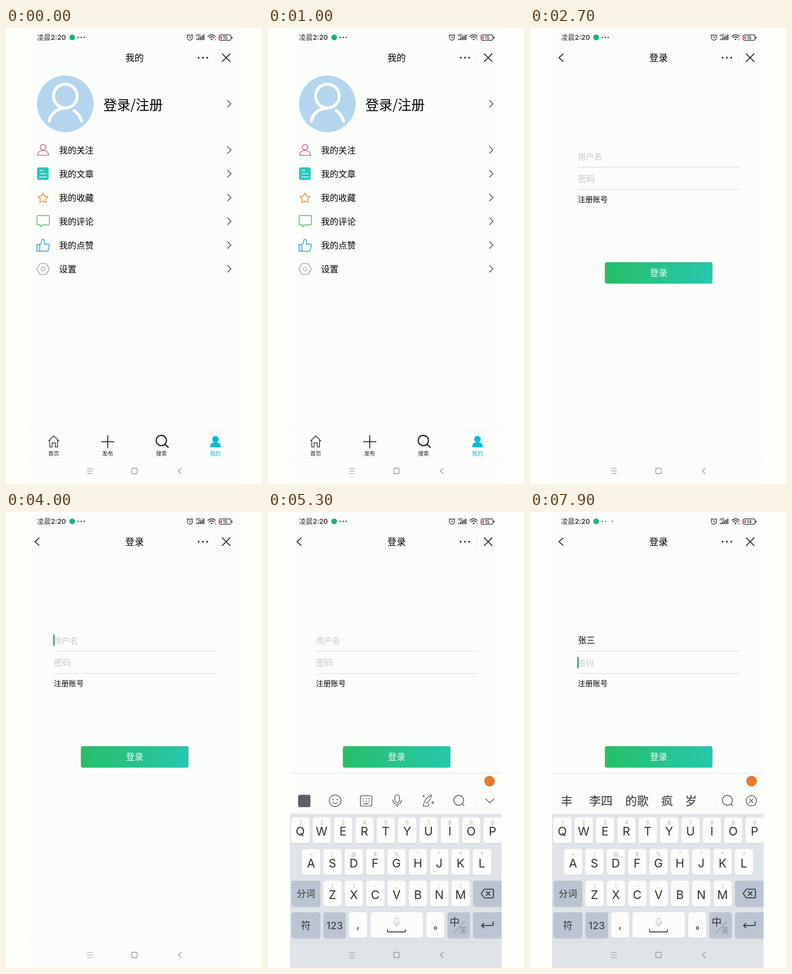
These frames come from a looping animation (561 px wide and 998 px high, 8 s). An HTML page:

```html
<!DOCTYPE html>
<html lang="zh-CN">
<head>
<meta charset="utf-8">
<title>Login demo</title>
<style>
html, body { margin: 0; width: 100%; height: 100%; overflow: hidden; background: #fefffb; }
svg { display: block; width: 100vw; height: 100vh; }
text { font-family: "Noto Sans CJK SC", "Noto Sans CJK", sans-serif; white-space: pre; }
.lat { font-family: Inter, Roboto, sans-serif; }
.ln { fill: none; stroke-linecap: round; stroke-linejoin: round; }
</style>
</head>
<body>
<svg id="stage" viewBox="0 0 561 998"></svg>
<script>
const LOOP = 8000;
const BG = "#fbfdfa";
const stage = document.getElementById("stage");

const text = (s, x, y, size, fill = "#000", more = "") =>
  `<text x="${x}" y="${y}" font-size="${size}" fill="${fill}" ${more}>${s}</text>`;
const mid = (s, x, y, size, fill, more = "") =>
  text(s, x, y, size, fill, `text-anchor="middle" ${more}`);
const line = (d, color = "#222", w = 1.6, more = "") =>
  `<path class="ln" d="${d}" stroke="${color}" stroke-width="${w}" ${more}/>`;
const ring = (x, y, r, color, w) =>
  `<circle cx="${x}" cy="${y}" r="${r}" fill="none" stroke="${color}" stroke-width="${w}"/>`;
const dot = (x, y, r, fill, more = "") => `<circle cx="${x}" cy="${y}" r="${r}" fill="${fill}" ${more}/>`;
const box = (x, y, w, h, fill, rx = 0, more = "") =>
  `<rect x="${x}" y="${y}" width="${w}" height="${h}" rx="${rx}" fill="${fill}" ${more}/>`;
const group = (id, body, more = "") => `<g id="${id}" ${more}>${body}</g>`;
const range = (n, f) => Array.from({ length: n }, (_, i) => f(i)).join("");
const title = s => mid(s, 281.8, 73, 20.2, "#000", 'font-weight="500"');

function star(x, y, R, r) {
  const pts = Array.from({ length: 10 }, (_, i) => {
    const a = i * Math.PI / 5 - Math.PI / 2, q = i % 2 ? r : R;
    return (x + q * Math.cos(a)).toFixed(1) + " " + (y + q * Math.sin(a)).toFixed(1);
  });
  return "M" + pts.join("L") + "Z";
}

function statusBar() {
  const c = "#333";
  return text("凌晨", 68, 26.4, 15, c, 'font-weight="500"') +
    text("2:20", 98.3, 26.2, 14.8, c, 'class="lat" font-weight="600"') +
    dot(145, 20.5, 6.3, "#16b586") +
    dot(158.5, 20.5, 1.6, c, 'id="n0"') + dot(165, 20.5, 1.6, c, 'id="n1"') + dot(171.3, 20.5, 1.6, c, 'id="n2"') +
    ring(403, 21, 5.7, c, 1.4) + line("M403 18V21.5H405.5M396.5 16.5L399 14M409.5 16.5L407 14", c, 1.3) +
    text("HD", 416, 18.5, 7, c, 'class="lat" font-weight="600"') +
    range(5, i => box(417 + i * 3.8, 23.5 - i * 2.3, 2.4, 3 + i * 2.3, c, .6)) +
    line("M442.5 18.2Q450.5 11.5 458.5 18.2M445.3 21.4Q450.5 17 455.7 21.4", c, 1.9) +
    dot(450.5, 25, 1.8, c) + line("M457 23V27M459.3 23V27", "#777", .8) +
    box(467, 15, 26, 12, "none", 3.5, `stroke="${c}" stroke-width="1.6"`) +
    box(494.5, 18.7, 1.8, 4.6, c, .9) + box(469.6, 17.4, 3.4, 7.2, "#e5483b", 1) +
    `<text id="charge" class="lat" x="480.5" y="24.8" font-size="10" font-weight="600" text-anchor="middle" fill="${c}"></text>`;
}

const capsule = () =>
  [422, 431.5, 441].map(x => dot(x, 65, 1.9, "#222")).join("") +
  line("M457.5 55V76", "#e9ece9", 1) + line("M474 56.5L491 73.5M491 56.5L474 73.5", "#222", 1.9);

function profile() {
  const rows = ["我的关注", "我的文章", "我的收藏", "我的评论", "我的点赞", "设置"];
  const chevron = y => line(`M485.5 ${y - 7.5}L493 ${y}L485.5 ${y + 7.5}`, "#222", 1.4);
  const pale = "#fbfefd";
  const tab = (s, x, color = "#222") => mid(s, x, 936, 12, color);
  const cyan = "#05bcd5";
  return title("我的") +
    dot(130, 166, 62, "#b4d5ee") + ring(130, 149, 26, pale, 6.5) +
    line("M95 204C98 187 112 175.5 130 175.5M149.5 181C157 186 163 194 165.5 204", pale, 6.5) +
    text("登录/注册", 213.3, 179, 29.7) + chevron(166) +
    rows.map((s, i) => text(s, 116.3, 275 + 52 * i, 19) + chevron(267 + 52 * i)).join("") +
    ring(81.3, 261, 6, "#bb5590", 1.7) +
    line("M69 278.5C69 264.5 93.5 264.5 93.5 278.5Z", "#bb5590") +
    box(68, 305, 25.5, 27.5, "#27c7bf", 4) + line("M74 312H81M75 319H88M73.5 326H88.5", "#fff", 1.7) +
    line(star(81, 372.7, 11.5, 6), "#e8ae68", 2.5) +
    line("M70 410.5H93Q95 410.5 95 412.5V429Q95 431 93 431H81L75.5 435V431H70Q68 431 68 429V412.5Q68 410.5 70 410.5Z", "#69bd74", 1.8) +
    line("M68 474H74V488.5H68ZM74 474C79 471 78 467 78.5 464Q79 462 81.5 462.5C85.5 464 85 469 84 473H92Q95.5 473 95 476L92.5 486Q92 488.5 89 488.5H74", "#3ba6dd", 1.9) +
    line("M74.5 515.5H88L95 527.5L88 539.5H74.5L67.5 527.5Z", "#a0a0a0", 1.6) + ring(81.2, 527.5, 4, "#a0a0a0", 1.5) +
    line("M48 880.5H512", "#e9eff2", 1) +
    line("M93 904L104.5 892.5L116 904M96 902V917H101V908H108V917H113V902", "#222", 1.5) +
    line("M209.5 905.5H236.5M223 892V919", "#222", 2) +
    ring(340.4, 902.8, 11.2, "#222", 2.6) + line("M348.5 911L355.3 917.5", "#222", 2.8) +
    dot(459, 900, 7.2, cyan) + `<path d="M447.5 917.5C447 909 452 907.5 456 906.5H462C466 907.5 471 909 470.5 917.5Z" fill="${cyan}"/>` +
    tab("首页", 104.5) + tab("发布", 222.7) + tab("搜索", 340.7) + tab("我的", 458.8, cyan);
}

function login() {
  return box(48, 40, 464, 901, BG) +
    line("M72.5 57L63.5 65L72.5 73", "#222", 1.9) + title("登录") + capsule() +
    group("form",
      `<text id="user" x="105" y="288.3"></text><text id="pass" x="105" y="336.8"></text>` +
      line("M105 304.5H459M105 353.5H459", "#cfd1cf", 1) +
      text("注册账号", 104.8, 381.3, 16.4) +
      box(164.3, 512.8, 235.4, 46.4, "url(#btn)", 4, 'stroke="#000" stroke-opacity=".2" stroke-width=".8"') +
      mid("登录", 282, 543.3, 19, "#f4fffa") +
      box(103.7, 268, 2.6, 25, "#0c8a80", 0, 'id="caret"'));
}

function key(x, y, w, dark) {
  return box(x, y + 1.2, w, 56.5, "#bfc6d0", 5.5) + box(x, y, w, 56.5, dark ? "#bac4d2" : "#fcfdfa", 5.5);
}

function letters(chars, hints, x0, y) {
  return range(chars.length, i => {
    const x = x0 + 46.8 * i;
    return key(x, y, 40, false) +
      mid(hints[i], x + 20, y + 15, 11.5, "#a9adb2", 'class="lat"') +
      mid(chars[i], x + 19.8, y + 39.6, 26, "#303336", 'class="lat"');
  });
}

function keyboard() {
  const c = "#555a61", ink = "#303336";
  const search = x => ring(x, 631, 10.8, c, 1.7) + line(`M${x + 8} 639L${x + 11.5} 643`, c, 1.8);
  const bar = x => line(`M${x} 621V644`, "#e0e3e4", 1);
  const words = list => list.map(([s, x], i) =>
    text(s, x, 642, 25.8, list.hot && !i ? "#e9702f" : ink)).join("");
  const typed = Object.assign([["张三", 68], ["这是", 155.5], ["掌上", 234.5], ["早上", 313.5], ["竹笋", 392.5]], { hot: true });
  const first = Object.assign([["在", 68], ["这", 129], ["中", 183], ["只", 237], ["张", 291], ["字", 345], ["做", 399]], { hot: true });
  const next = [["丰", 67.5], ["李四", 129.5], ["的歌", 208.5], ["疯", 287.5], ["岁", 340]];
  const more = bar(453.5) + line("M481.5 625L490 633L481.5 641", c, 1.8);
  const tools = box(66, 619, 27, 27, "#5b6068", 4) +
    ring(147, 632, 12.7, c, 1.7) + dot(142.3, 629.5, 1.5, c) + dot(151.7, 629.5, 1.5, c) + line("M141.5 635.5Q147 641 152.5 635.5", c, 1.7) +
    box(202.5, 621, 25, 22.5, "none", 3, `stroke="${c}" stroke-width="1.7"`) +
    line("M208 627.5H209M214.5 627.5H215.5M221 627.5H222M208 633H209M214.5 633H215.5M221 633H222M210 638.5H220", c, 1.8) +
    box(278.2, 619, 9.6, 17, "none", 4.8, `stroke="${c}" stroke-width="1.7"`) + line("M273.5 630C273.5 643.5 292.5 643.5 292.5 630M283 640.5V645", c, 1.7) +
    line("M340 644C342 632 348 624 358 619.5C357 627 354 634 346 637M340 644H350Q354 643 352 638M341 620V624M339 622H343M361 633V639M358 636H364", c, 1.5) +
    search(418) + bar(453.5) + line("M477 628L486 636.5L495 628", c, 1.7);
  return box(48, 571, 464, 90, BG) + line("M48 571.5H512", "#d9dde1", 1) + box(48, 660.5, 464, 338, "#dfe4e9") +
    dot(485.5, 589, 11.5, "#e8792f") +
    group("tools", tools) +
    group("one", words(first) + more) + group("two", words(typed) + more) +
    group("next", words(next) + bar(405) + search(432.5) + ring(485, 632, 11.3, c, 1.6) + line("M481 628L489 636M489 628L481 636", c, 1.6)) +
    `<text id="pinyin" class="lat" x="61.5" y="596.5" font-size="21.5" fill="${ink}"></text>` +
    letters("QWERTYUIOP", "1234567890", 51, 668.5) +
    letters("ASDFGHJKL", "~!@#%“”*?", 74.5, 738) +
    letters("ZXCVBNM", "()-_:;/", 121.5, 807) +
    key(51, 807, 64, true) + mid("分词", 83, 843, 20.2, ink) +
    key(449, 807, 70, true) + line("M474 825.5H492Q494 825.5 494 827.5V842.5Q494 844.5 492 844.5H474L467 835ZM478.5 831L486.5 839M486.5 831L478.5 839", ink, 2) +
    key(51, 876, 64, true) + mid("符", 83, 912, 21, ink) +
    key(121.5, 876, 49.5, true) + mid("123", 146, 913, 22, ink, 'class="lat"') +
    key(178, 876, 39.5, false) + mid(",", 197.5, 911, 24, ink, 'class="lat"') +
    key(224.5, 876, 115, false) + box(278.5, 888.5, 7, 13, "none", 3.5, 'stroke="#b5bac0" stroke-width="1.3"') +
    line("M275 897C275 907 289 907 289 897M282 904.5V908", "#b5bac0", 1.3) + line("M262 914.5V917Q262 919 264 919H299Q301 919 301 917V914.5", ink, 2) +
    key(347, 876, 39, false) + ring(367, 910.5, 2.7, ink, 1.6) +
    key(393, 876, 49.5, true) + text("中", 398, 905.3, 22, ink) + line("M406 923L431 896", "#8b929c", 1.2) + text("英", 420, 921.3, 15.5, "#838b96") +
    key(449, 876, 70, true) + line("M493.5 897V902Q493.5 905 490.5 905H468M473 900L468 905L473 910", ink, 2);
}

stage.innerHTML =
  `<defs><linearGradient id="btn"><stop offset="0" stop-color="#26bf66"/><stop offset="1" stop-color="#26c7ae"/></linearGradient>
   <clipPath id="phone"><rect x="48" width="464" height="998"/></clipPath></defs>` +
  box(0, 0, 561, 998, "#fefffb") +
  `<g clip-path="url(#phone)">` + box(48, 0, 464, 998, BG) +
  group("profile", profile() + capsule()) + group("login", login()) +
  box(48, 0, 464, 40, BG) + statusBar() +
  box(48, 941, 464, 57, BG) + group("keys", keyboard()) +
  line("M48 941.5H512", "#000", 1, 'opacity=".06"') +
  line("M178 964H190M178 969.5H190M178 975H190", "#858888", 1.2) +
  box(275.5, 963.5, 12, 12, "none", 2.8, 'stroke="#858888" stroke-width="1.3"') +
  line("M384 963.5L377.5 969.5L384 975.5", "#858888", 1.3) + "</g>";

const el = id => document.getElementById(id);
const show = (id, on) => el(id).setAttribute("visibility", on ? "inherit" : "hidden");
const move = (id, x, y) => el(id).setAttribute("transform", `translate(${x} ${y})`);
const ease = (t, a, b) => {
  const p = Math.min(1, Math.max(0, (t - a) / (b - a)));
  return 1 - (1 - p) ** 3;
};
const within = (t, a, b) => t >= a && t < b;

function field(id, value, hint, focused) {
  const f = el(id);
  f.textContent = value || hint;
  f.setAttribute("fill", value ? "#000" : "#c5c7c6");
  f.setAttribute("font-size", focused ? 17.6 : 18.8);
}

// Caret on-times in ms
const blinks = [[2300, 2500], [3000, 3500], [4000, 4700], [6000, 7400], [7500, 8000]];

function draw(t) {
  const slide = ease(t, 1200, 1600);
  move("login", 464 * (1 - slide), 0);
  show("login", t >= 1200);
  show("profile", t < 1600);
  show("form", t >= 1900);

  const rise = ease(t, 4250, 4650);
  move("keys", 0, 427 * (1 - rise));
  show("keys", t >= 4250);

  const done = t >= 7100, onPass = t >= 7500;
  field("user", done ? "张三" : "", "用户名", t >= 2300 && !onPass);
  field("pass", "", "密码", onPass);
  show("caret", t >= 1900 && blinks.some(([a, b]) => within(t, a, b)));
  move("caret", done && !onPass ? 36 : 0, onPass ? 49 : 0);

  show("tools", within(t, 4250, 6000));
  show("one", within(t, 6000, 6400));
  show("two", within(t, 6400, 7100));
  show("next", done);
  el("pinyin").textContent = within(t, 6000, 6400) ? "z" : within(t, 6400, 7100) ? "z's" : "";

  el("charge").textContent = t < 6000 ? 15 : 14;
  const shift = t >= 7800;
  el("n2").setAttribute("cx", shift ? 180.5 : 171.3);
  for (const id of ["n0", "n1", "n2"]) el(id).setAttribute("r", shift ? 1.3 : 1.6);
}

const start = performance.now();
function tick() {
  draw((performance.now() - start) % LOOP);
  requestAnimationFrame(tick);
}
tick();
</script>
</body>
</html>
```
